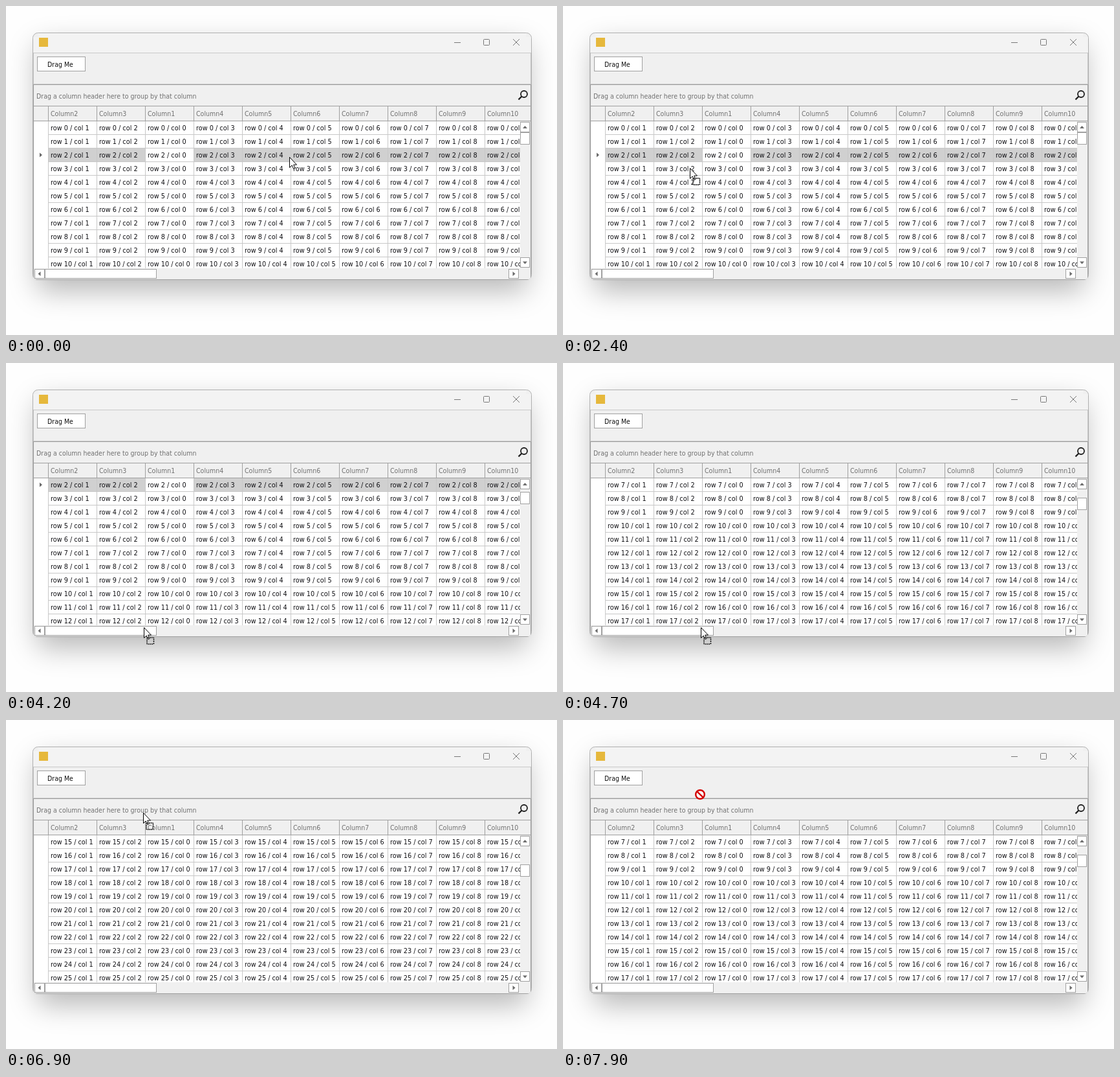
An HTML page with a canvas for the animation above (8000 ms loop, 852x508 px).

```html
<!DOCTYPE html>
<html lang="en">
<head>
<meta charset="utf-8">
<title>Grid auto-scroll while dragging</title>
<style>
  html, body { margin: 0; width: 100%; height: 100%; overflow: hidden; background: #fefefe; }
  canvas { display: block; }
</style>
</head>
<body>
<canvas id="stage" width="852" height="508"></canvas>
<script>
const ctx = document.getElementById('stage').getContext('2d');
const LOOP = 8000, STEP = 100, DRAG_START = 1400;
const LINE = '#a0a0a0', GRID = '#c8c8c8', FACE = '#f0f0f0', MUTED = '#707070';
const LEFT = 65, COL_W = 75, TOP = 178, ROW_H = 21, ROWS = 11, VIEW_H = 227;
const FOCUS_ROW = 2;

// Ten columns, with the first one moved to third place.
const columns = Array.from({ length: 10 }, (_, i) => i < 2 ? i + 1 : i === 2 ? 0 : i);

// Prefer the condensed face when it is installed.
const widthOf = font => {
  ctx.font = font;
  return ctx.measureText('Column iW').width;
};
const condensed = widthOf('20px "DejaVu Sans Condensed", monospace') !== widthOf('20px monospace');
const family = (condensed ? '"DejaVu Sans Condensed", ' : '') + '"Noto Sans", sans-serif';
const CELL_FONT = (condensed ? 10.8 : 10.5) + 'px ' + family;
const LABEL_FONT = (condensed ? 10.5 : 10.1) + 'px ' + family;

// Each leg eases out from where the last one ended.
const LEGS = [
  { from: 200, to: 1100, x: 113, y: 93, power: 1.5 },
  { from: 1300, to: 1400, x: 135, y: 104, power: 1 },
  { from: 1400, to: 2200, x: 191, y: 199, power: 1 },
  { from: 2200, to: 4000, x: 213, y: 408, power: 2.4 },
  { from: 5600, to: 7900, x: 212, y: 115, power: 2.8 }
];

function pointerAt(t) {
  let x = 438, y = 233;
  for (const leg of LEGS) {
    const k = Math.max(0, Math.min(1, (t - leg.from) / (leg.to - leg.from)));
    const eased = 1 - (1 - k) ** leg.power;
    x += (leg.x - x) * eased;
    y += (leg.y - y) * eased;
  }
  return [Math.round(x), Math.round(y)];
}

const stepsSince = (t, start, max) =>
  Math.max(0, Math.min(max, (t - start) / STEP + 1));

function firstRow(t) {
  return stepsSince(t, 4100, 8) + stepsSince(t, 5000, 2)
    + stepsSince(t, 5300, 5) - stepsSince(t, 7200, 8);
}

function fill(x, y, w, h, color) {
  ctx.fillStyle = color;
  ctx.fillRect(x, y, w, h);
}

function box(x, y, w, h, color = '#fff', border = LINE) {
  fill(x, y, w, h, border);
  fill(x + 1, y + 1, w - 2, h - 2, color);
}

function text(str, x, y, color, font) {
  ctx.font = font;
  ctx.fillStyle = color;
  ctx.fillText(str, x, y);
}

function shape(points) {
  ctx.beginPath();
  points.forEach(([x, y]) => ctx.lineTo(x, y));
  ctx.closePath();
}

function line(x0, y0, x1, y1, color, width = 1) {
  ctx.strokeStyle = color;
  ctx.lineWidth = width;
  ctx.beginPath();
  ctx.moveTo(x0, y0);
  ctx.lineTo(x1, y1);
  ctx.stroke();
}

function circle(x, y, r) {
  ctx.beginPath();
  ctx.arc(x, y, r, 0, Math.PI * 2);
}

function roundBox(x, y, w, h, r) {
  ctx.beginPath();
  ctx.roundRect(x, y, w, h, r);
}

function triangle(x, y, quarterTurns = 0) {
  ctx.save();
  ctx.translate(x, y);
  ctx.rotate(quarterTurns * Math.PI / 2);
  shape([[-2, -3.5], [2, 0], [-2, 3.5]]);
  ctx.fillStyle = '#6a6a6a';
  ctx.fill();
  ctx.restore();
}

function drawShell() {
  fill(0, 0, 852, 508, '#fefefe');
  ctx.save();
  ctx.shadowColor = 'rgba(0,0,0,.28)';
  ctx.shadowBlur = 44;
  ctx.shadowOffsetY = 18;
  ctx.fillStyle = FACE;
  roundBox(48, 42, 758, 380, 8);
  ctx.fill();
  ctx.restore();
  ctx.fillStyle = FACE;
  ctx.strokeStyle = '#b0b0b0';
  ctx.lineWidth = 1;
  roundBox(41.5, 41.5, 771, 381, 8);
  ctx.fill();
  ctx.stroke();
}

function drawTitleBar() {
  fill(42, 48, 770, 24, '#f3f3f3');
  fill(50, 42, 754, 6, '#f3f3f3');
  fill(51, 49, 14, 14, '#e6b83c');
  line(693, 56.5, 703, 56.5, '#777');
  line(784, 51, 794, 61, '#777');
  line(794, 51, 784, 61, '#777');
  roundBox(738.5, 51.5, 9, 9, 1);
  ctx.stroke();
}

function drawPanels() {
  box(42, 72, 770, 49, FACE, '#c8c8c8');
  box(42, 121, 770, 302, FACE, LINE);
  box(48, 78, 75, 23);
  text('Drag Me', 64, 94, '#101010', LABEL_FONT);
  text('Drag a column header here to group by that column', 47, 143, MUTED, LABEL_FONT);
  line(797.5, 139.5, 792.5, 144.5, '#222', 2.4);
  ctx.lineWidth = 1.8;
  circle(801, 136, 5);
  ctx.stroke();
}

function drawHeader() {
  fill(43, 154, 768, 1, LINE);
  fill(43, 177, 768, 1, LINE);
  columns.forEach((col, i) => {
    const x = LEFT + i * COL_W;
    fill(x, 154, 1, 24, LINE);
    text('Column' + (col + 1), x + 4, 170, MUTED, LABEL_FONT);
  });
}

function drawRows(first) {
  ctx.save();
  ctx.beginPath();
  ctx.rect(43, TOP, 752, VIEW_H);
  ctx.clip();
  fill(43, TOP, 752, VIEW_H, '#fff');
  for (let i = 0; i < ROWS; i++) {
    const row = first + i, y = TOP + i * ROW_H, focused = row === FOCUS_ROW;
    if (focused) triangle(54, y + 10);
    columns.forEach((col, c) => {
      const x = LEFT + c * COL_W;
      if (focused && col !== 0) fill(x, y, COL_W, ROW_H, '#d0d0d0');
      fill(x, y, 1, ROW_H, GRID);
      text(`row ${row} / col ${col}`, x + 4, y + 14, '#101014', CELL_FONT);
    });
    fill(LEFT, y + ROW_H - 1, 730, 1, GRID);
  }
  ctx.restore();
}

function drawScrollBars(first) {
  fill(795, TOP, 16, VIEW_H, FACE);
  box(795, 179, 15, 16);
  triangle(802.5, 187, -1);
  box(795, 388, 15, 16);
  triangle(802.5, 396.5, 1);
  box(795, Math.round(195 + first * 1.87), 15, 19);

  box(44, 406, 16, 15);
  triangle(51.5, 413.5, 2);
  box(60, 406, 173, 15);
  box(777, 406, 16, 15);
  triangle(785.5, 413.5);
}

function drawWindow(first) {
  drawShell();
  ctx.save();
  roundBox(41, 41, 772, 382, 8);
  ctx.clip();
  drawTitleBar();
  drawPanels();
  drawHeader();
  drawRows(first);
  drawScrollBars(first);
  ctx.restore();
}

function drawNoDrop(x, y) {
  circle(x, y, 6.8);
  ctx.fillStyle = '#fff';
  ctx.fill();
  line(x - 4.7, y - 4.7, x + 4.7, y + 4.7, '#d40000', 2.4);
  circle(x, y, 6.8);
  ctx.stroke();
}

function drawPointer(x, y, dragging) {
  ctx.save();
  ctx.translate(x + 0.5, y + 0.5);
  ctx.lineWidth = 1;
  ctx.strokeStyle = '#000';
  ctx.fillStyle = '#fff';
  shape([[0, 0], [0, 16], [3.7, 12.5], [6.2, 18], [8.6, 17], [6.2, 11.6], [11, 11.6]]);
  ctx.fill();
  ctx.stroke();
  if (dragging) {
    roundBox(4.5, 15.5, 10.5, 10, 1);
    ctx.lineWidth = 1.5;
    ctx.strokeStyle = '#fff';
    ctx.stroke();
    ctx.strokeStyle = '#000';
    ctx.setLineDash([2, 0.8]);
    ctx.stroke();
  }
  ctx.restore();
}

function draw(time) {
  const t = Math.floor((time % LOOP) / STEP) * STEP;
  const [x, y] = pointerAt(t), dragging = t >= DRAG_START;
  drawWindow(firstRow(t));
  if (dragging && y < 122) drawNoDrop(x, y);
  else drawPointer(x, y, dragging);
}

const start = performance.now();
function frame() {
  draw(performance.now() - start);
  requestAnimationFrame(frame);
}
frame();
</script>
</body>
</html>
```
